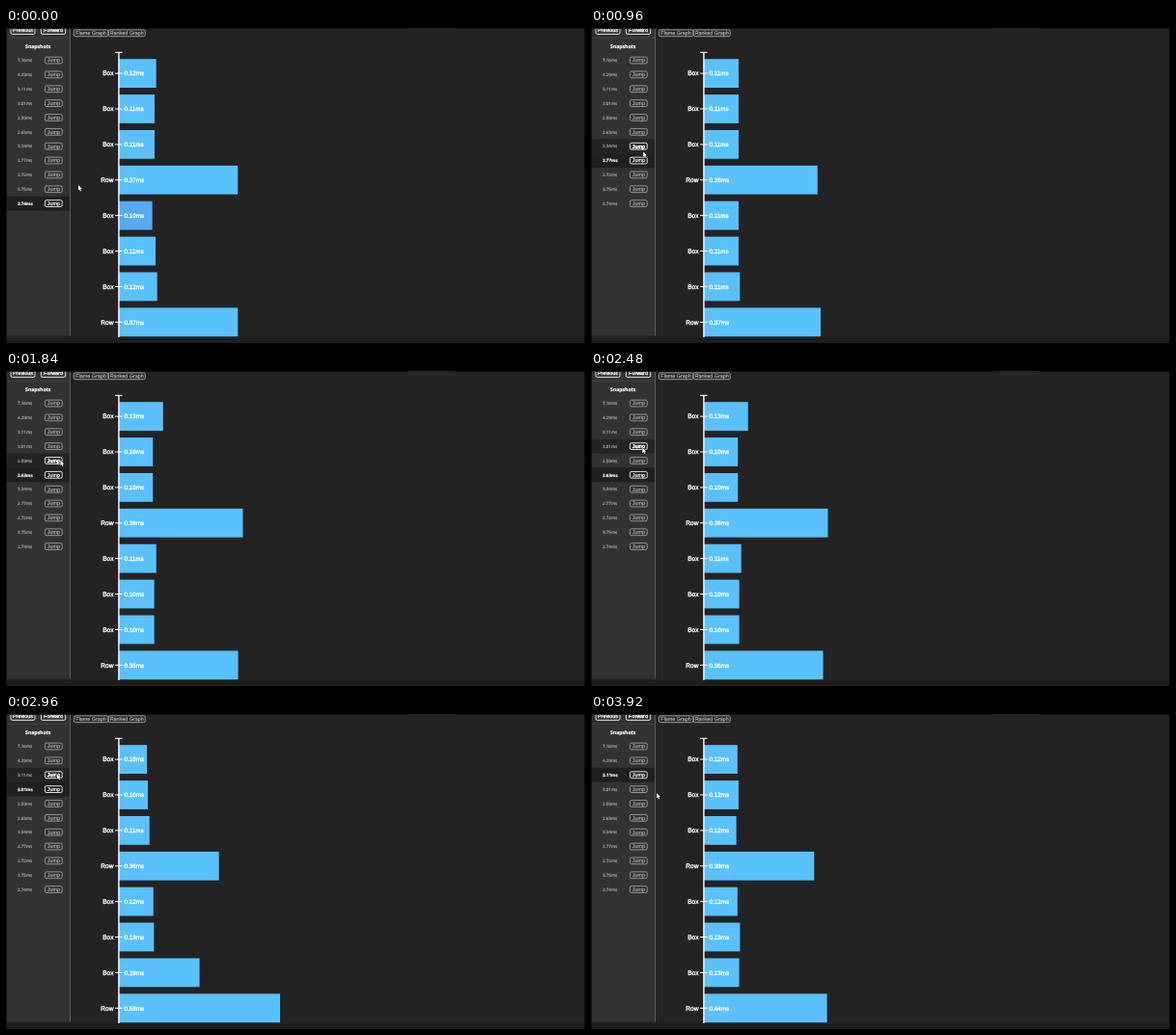
Animation, 600 px wide and 327 px high, one loop 4000 ms. Source, as an HTML page with a canvas:

```html
<!DOCTYPE html>
<html lang="en">
<head>
<meta charset="utf-8">
<title>Snapshot profiler</title>
<style>
  html, body { margin: 0; width: 100%; height: 100%; overflow: hidden; background: #232323; }
  canvas { display: block; }
</style>
</head>
<body>
<canvas id="stage" width="600" height="327"></canvas>
<script>
const ctx = document.getElementById('stage').getContext('2d');
const LOOP = 4000, STEP = 80;
const SANS = '"Liberation Sans", Arial, sans-serif';
const UI = '"Open Sans", "Noto Sans", sans-serif';
const ROW_TOP = 26.1, ROW_H = 14.86;
const AXIS = 117, BAR_TOP = 32.2, BAR_H = 29.8, BAR_PITCH = 36.89;

const snapshots = [7.16, 4.29, 3.11, 3.01, 2.59, 2.63, 3.34, 2.77, 2.72, 3.75, 2.74];

// Each row holds its boxes' render times and, last, its own, in microseconds.
// The first view is there at load, the others follow a click at time `at`.
const views = [
  { at: 0, scale: 0.333, rows: [[116, 111, 111, 32], [104, 114, 119, 33]], dim: 4 },
  { at: 720, scale: 0.327, rows: [[110, 110, 110, 30], [110, 110, 114, 36]] },
  { at: 1600, scale: 0.352, rows: [[130, 100, 100, 35], [110, 104, 104, 33]] },
  { at: 2560, scale: 0.288, rows: [[101, 104, 110, 45], [124, 126, 290, 40]] },
  { at: 3440, scale: 0.29, rows: [[120, 124, 116, 34], [120, 129, 126, 65]] }
];

// Pointer moves: start, end, x, y
const home = [75, 163];
const moves = [
  [0, 480, 53.3, 139], [720, 1360, 55.4, 105.2], [1520, 1840, 56.4, 92.6],
  [2000, 2240, 53.3, 79.6], [2560, 2960, 53, 62], [3600, 3920, 68, 82]
];

function ease(t, from, to) {
  const k = Math.min(1, Math.max(0, (t - from) / (to - from)));
  return k * k * (3 - 2 * k);
}

function pointerAt(t) {
  return moves.reduce(([x, y], [from, to, tx, ty]) => {
    const k = ease(t, from, to);
    return [x + (tx - x) * k, y + (ty - y) * k];
  }, home);
}

function rowUnder([x, y]) {
  return x < 66 ? Math.floor((y - ROW_TOP) / ROW_H) : -1;
}

function rect(x, y, w, h, color) {
  ctx.fillStyle = color;
  ctx.fillRect(x, y, w, h);
}

// `heavy` thickens the strokes of small type
function text(str, x, y, font, color, align = 'left', heavy = 0.2) {
  ctx.font = font;
  ctx.textAlign = align;
  ctx.fillStyle = ctx.strokeStyle = color;
  ctx.lineWidth = heavy;
  ctx.fillText(str, x, y);
  ctx.strokeText(str, x, y);
}

function button(label, x, y, w, h, color, heavy) {
  ctx.beginPath();
  ctx.roundRect(x, y, w, h, 1.5);
  ctx.strokeStyle = color;
  ctx.lineWidth = 0.85;
  ctx.stroke();
  text(label, x + w / 2, y + h / 2 + 1.9, `5.4px ${SANS}`, color, 'center', heavy);
}

function drawSidebar(selected, hover) {
  rect(1, 0, 65, 319.5, '#323232');
  rect(1, 10, 65, 0.7, '#454545');
  rect(66, 0, 1, 319.5, '#5a5a5a');
  button('Previous', 5, -1.4, 25, 7.8, '#fff', 0.3);
  button('Forward', 36.4, -1.4, 25.2, 7.8, '#fff', 0.3);
  text('Snapshots', 33.2, 21, `bold 5.1px ${UI}`, '#fff', 'center');

  snapshots.forEach((ms, i) => {
    const top = ROW_TOP + i * ROW_H, mid = top + ROW_H / 2;
    const on = i === selected, over = i === hover;
    if (on || over) rect(1, top, 65, ROW_H, on ? '#1f1f1f' : '#242424');
    text(ms.toFixed(2) + 'ms', 12, mid + 1.7, `${on ? 'bold ' : ''}4.5px ${UI}`, on ? '#fff' : '#a8a8a8');
    button('Jump', 40.4, mid - 3.4, 17.8, 6.8, on || over ? '#fff' : '#a4a4a4', over ? 0.5 : 0.2);
  });
}

function drawBar(i, time, scale, name, color) {
  const top = BAR_TOP + BAR_PITCH * i, mid = top + BAR_H / 2;
  rect(AXIS, top, time * scale, BAR_H, color);
  rect(113, mid - 0.5, 7.6, 1, '#fff');
  text(name, 111.5, mid + 2.3, `6.6px ${SANS}`, '#fff', 'right', 0.35);
  text((time / 1000).toFixed(2) + 'ms', 122.4, mid + 2.2, `6.3px ${SANS}`, '#fff', 'left', 0.35);
}

function drawChart({ rows, scale, dim }) {
  button('Flame Graph', 70.4, 1.9, 35.4, 6.8, '#b0b0b0');
  button('Ranked Graph', 106.2, 1.9, 38, 6.8, '#b0b0b0');

  rows.forEach((times, r) => {
    const total = times.reduce((a, b) => a + b);
    times.forEach((time, c) => {
      const i = r * 4 + c, isRow = c === 3;
      drawBar(i, isRow ? total : time, scale, isRow ? 'Row' : 'Box', i === dim ? '#55aaf0' : '#5ac1ff');
    });
  });
  rect(AXIS - 0.8, 25, 1.4, 296, '#fff');
  rect(113, 24.8, 7.6, 1, '#fff');
}

function drawPointer([x, y]) {
  ctx.beginPath();
  [[0, 0], [0, 5.6], [1.2, 4.5], [2, 6.5], [3, 6.1], [2.2, 4.2], [3.9, 4.1]]
    .forEach(([dx, dy]) => ctx.lineTo(x + dx, y + dy));
  ctx.closePath();
  ctx.lineWidth = 0.9;
  ctx.strokeStyle = '#111';
  ctx.stroke();
  ctx.fillStyle = '#fff';
  ctx.fill();
}

function draw(now) {
  const t = Math.floor((now % LOOP) / STEP) * STEP;
  const view = views.filter(v => v.at <= t).pop();
  const selected = view.at ? rowUnder(pointerAt(view.at)) : snapshots.length - 1;
  const pointer = pointerAt(t);

  rect(0, 0, 600, 327, '#232323');
  rect(0, 321, 600, 6, '#1f1e1f');
  drawSidebar(selected, rowUnder(pointer));
  drawChart(view);
  rect(0, 0, 600, 0.8, '#0c0c0c');
  rect(416, 0, 50, 1, '#14243c');
  rect(0, 0, 1, 327, '#151515');
  rect(599, 0, 1, 327, '#101010');
  drawPointer(pointer);
}

ctx.textRendering = 'geometricPrecision';
ctx.lineJoin = 'round';
const start = performance.now();
function tick() {
  draw(performance.now() - start);
  requestAnimationFrame(tick);
}
tick();
</script>
</body>
</html>
```
